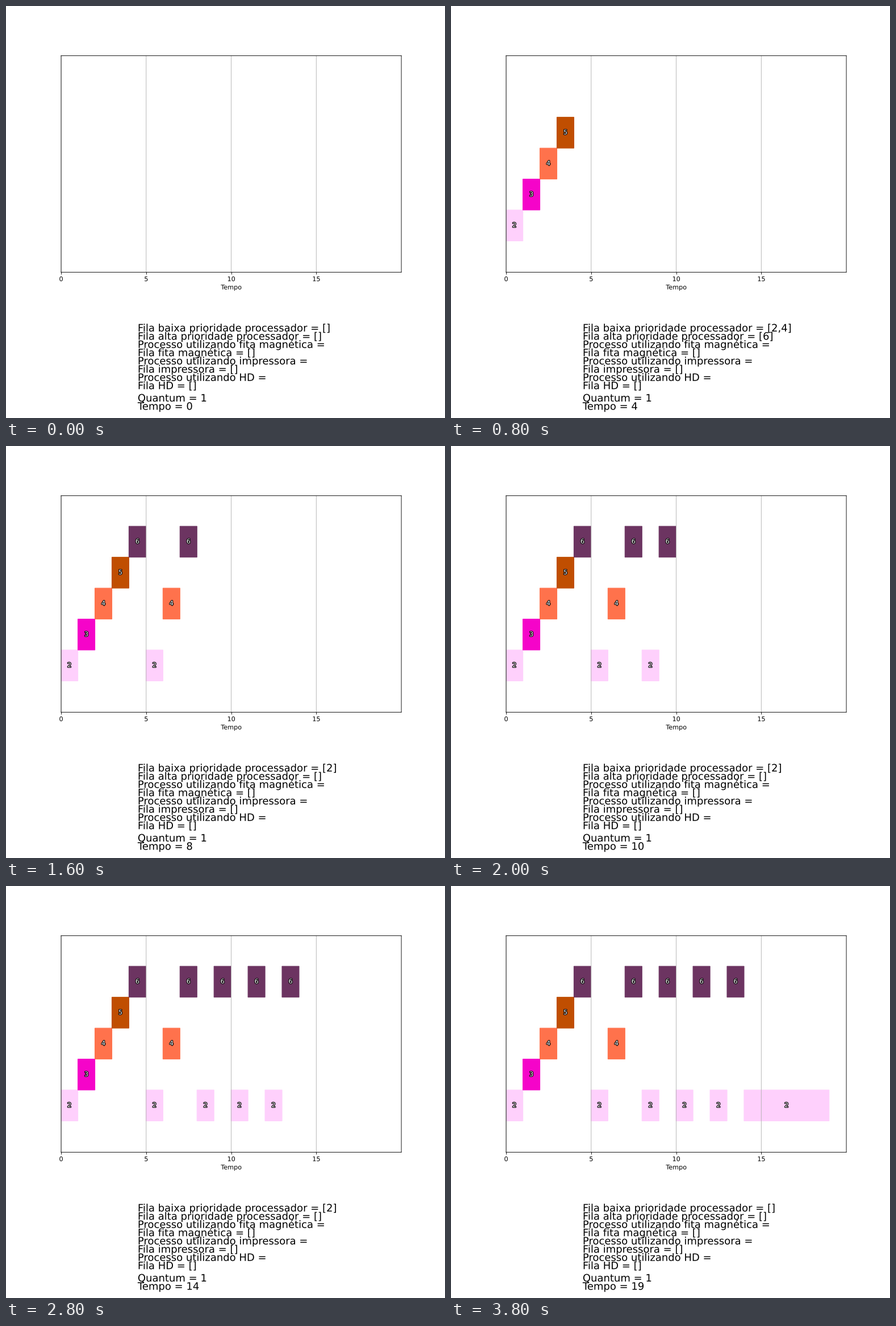
Recreate the animation shown at these times as a matplotlib script. Size 773 by 725 pixels, loop 4 s.

```python
import matplotlib.pyplot as plt
from matplotlib.animation import FuncAnimation
from matplotlib.patches import Rectangle
from matplotlib.patheffects import Normal, withStroke
from matplotlib.transforms import Affine2D

W, H, DPI = 773, 725, 80
BASE_W, BASE_H = 960, 900  # layout units
STEPS, INTERVAL = 20, 200
QUANTUM = 1

BURSTS = {2: 99, 3: 1, 4: 2, 5: 1, 6: 5}
COLORS = {2: "xkcd:pale mauve", 3: "xkcd:hot magenta",
          4: "xkcd:pinkish orange", 5: "xkcd:burnt orange", 6: "xkcd:grape"}

plt.rcParams.update({"font.family": "DejaVu Sans", "font.size": 10.07,
                     "path.snap": False})
SMOOTH = [Normal()]  # draws text as outlines, placed between pixels
OUTLINE = [withStroke(linewidth=2, foreground="black")]

fig = plt.figure(figsize=(W / DPI, H / DPI), dpi=DPI, facecolor="white")
ax = fig.add_axes([120.5 / BASE_W, 318.5 / BASE_H, 744 / BASE_W, 473 / BASE_H])
ax.set(xlim=(0, STEPS), ylim=(0.5, 7.5), xticks=range(0, STEPS, 5), yticks=[])
ax.set_xlabel("Tempo", path_effects=SMOOTH)
for label in ax.get_xticklabels():
    label.set_path_effects(SMOOTH)
ax.grid(True, axis="x")

# The frame lines sit half a unit off the bars.
bar_space = ax.transData + Affine2D().translate(-0.4, 0.6)


def simulate():
    """Round robin: new processes first, then the ones sent back."""
    left = dict(BURSTS)
    high, low = list(BURSTS), []
    bars, states = [], [([], [], [])]
    current = None
    for t in range(STEPS - 1):
        if current and left[current]:
            low.append(current)
        previous, current = current, (high or low).pop(0)
        left[current] -= QUANTUM
        if current == previous:
            _, start, length = bars[-1]
            bars[-1] = (current, start, length + QUANTUM)
        else:
            bars.append((current, t, QUANTUM))
        states.append((list(bars), list(low), list(high)))
    return states


def show(queue):
    return "[" + ",".join(map(str, queue)) + "]"


def line(y, text=""):
    return fig.text(0.3, y, text, fontsize=16.2, path_effects=SMOOTH)


STATES = simulate()
low_text = line(0.21)
high_text = line(0.19)
line(0.17, "Processo utilizando fita magnética = ")
line(0.15, "Fila fita magnética = []")
line(0.13, "Processo utilizando impressora = ")
line(0.11, "Fila impressora = []")
line(0.09, "Processo utilizando HD = ")
line(0.07, "Fila HD = []")
line(0.04, f"Quantum = {QUANTUM}")
time_text = line(0.02)
drawn = []


def draw(t):
    while drawn:
        drawn.pop().remove()
    bars, low, high = STATES[t]
    for pid, start, length in bars:
        drawn.append(ax.add_patch(Rectangle(
            (start, pid - 0.5), length, 1, color=COLORS[pid], linewidth=1,
            transform=bar_space)))
        drawn.append(ax.text(
            start + length / 2, pid, str(pid), color="white", ha="center",
            va="center", path_effects=OUTLINE, transform=bar_space))
    low_text.set_text(f"Fila baixa prioridade processador = {show(low)}")
    high_text.set_text(f"Fila alta prioridade processador = {show(high)}")
    time_text.set_text(f"Tempo = {t}")
    return []


anim = FuncAnimation(fig, draw, frames=STEPS, interval=INTERVAL,
                     init_func=lambda: draw(0), repeat=True, repeat_delay=0)
plt.show()
```
